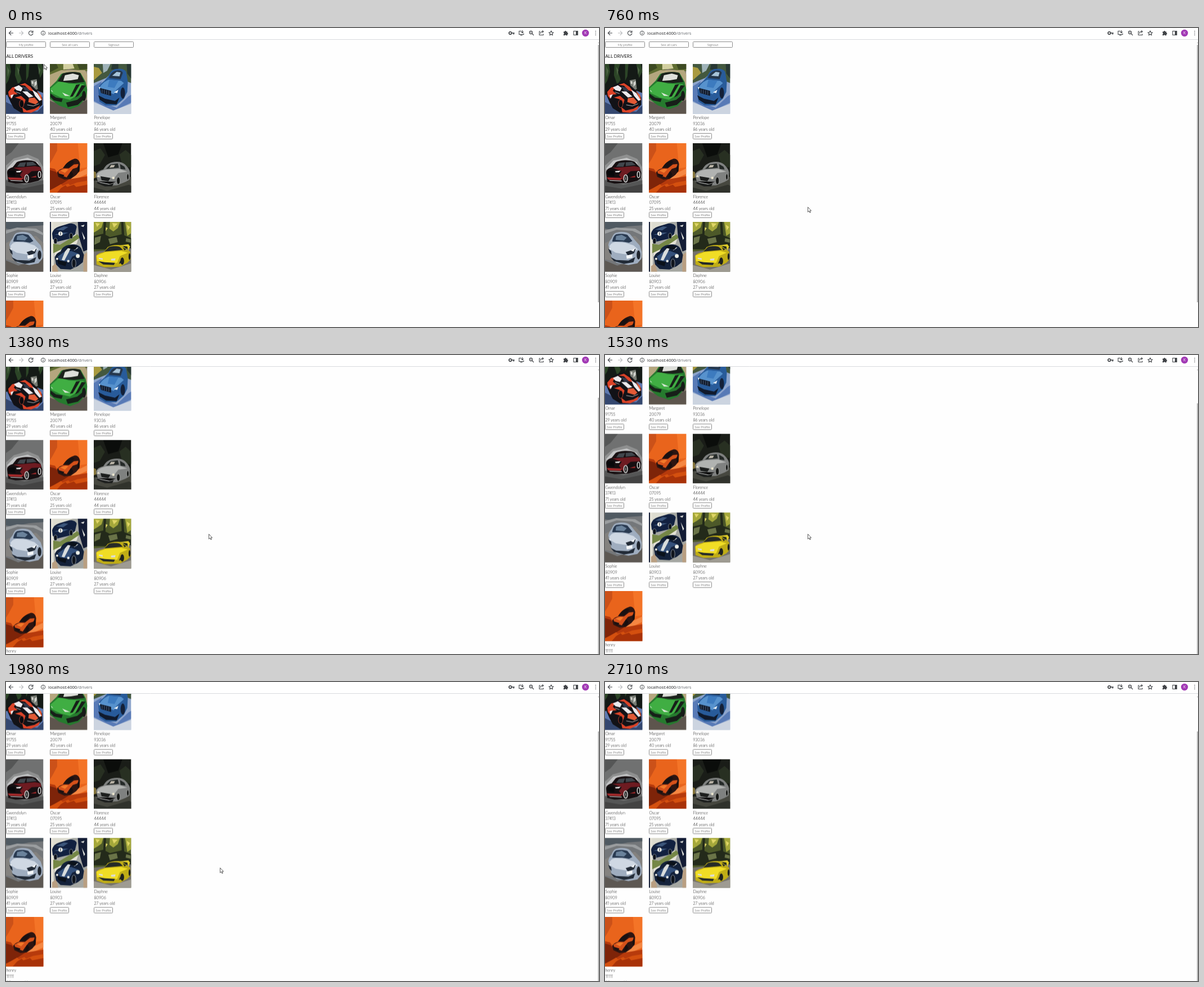
An HTML page for the animation above (5.13 s loop, 1054 by 532 pixels).

```html
<!DOCTYPE html>
<html lang="en">
<head>
<meta charset="utf-8">
<title>All drivers</title>
<style>
html, body { margin: 0; width: 100%; height: 100%; overflow: hidden; background: #fefefe; }
#stage { position: relative; width: 1054px; height: 532px; overflow: hidden; background: #fefefe; }
#page, #bar, #thumb, #cursor, .card, .btn, h1 { position: absolute; }
#page { inset: 0; font: 300 7.2px/10.6px Lato, "Open Sans", sans-serif; font-variant-numeric: proportional-nums; color: #111; white-space: nowrap; }
h1 { left: .5px; top: 44.5px; margin: 0; font: 400 7.9px/11px Lato, sans-serif; color: #111; }
.btn { box-sizing: border-box; height: 11px; border: 1px solid #8c8c8c; border-radius: 1.5px; background: #fff; color: #333; font: 300 6px/9.4px Lato, sans-serif; text-align: center; }
.nav { top: 24.4px; width: 71px; }
.card { width: 67px; }
.card svg { display: block; width: 66.5px; height: 88.7px; margin-bottom: 2.4px; }
.card p { margin: 0 0 0 .4px; }
.card .btn { left: 0; top: 122.6px; width: 34px; }
#bar { left: 0; top: 0; }
#thumb { left: 1052px; top: 30px; width: 2px; height: 458px; background: #b9b9b9; }
#cursor { left: 0; top: 0; }
#page, #thumb, #cursor { animation: 5130ms step-end infinite; }
#page { animation-name: scroll; }
#thumb { animation-name: thumb; }
#cursor { animation-name: point; }
@keyframes scroll {
  0% { transform: translateY(0); }
  23.976% { transform: translateY(-1px); }
  26.9% { transform: translateY(-53.7px); }
  29.824% { transform: translateY(-64.7px); }
  32.748%, 100% { transform: translateY(-67.5px); }
}
@keyframes thumb {
  0% { transform: translateY(0); }
  23.976% { transform: translateY(1px); }
  26.9% { transform: translateY(46px); }
  29.824% { transform: translateY(56px); }
  32.748%, 100% { transform: translateY(58px); }
}
@keyframes point {
  0% { transform: translate(67px, 64px); }
  3.118% { transform: translate(84px, 74px); }
  6.042% { transform: translate(129px, 117px); }
  8.966% { transform: translate(328px, 262px); }
  11.89% { transform: translate(360px, 317px); }
  14.814% { transform: translate(360px, 318px); }
  35.672% { transform: translate(361px, 320px); }
  38.596% { transform: translate(380px, 330px); }
  41.52% { transform: translate(436px, 344px); }
  44.054% { transform: translate(536px, 369px); }
  46.978% { transform: translate(840px, 463px); }
  49.902% { transform: translate(945px, 510px); }
  52.826%, 100% { transform: translate(1060px, 540px); }
}
</style>
</head>
<body>
<svg width="0" height="0" style="position:absolute">
<defs>
  <symbol id="red" viewBox="0 0 67 89" preserveAspectRatio="none">
    <path fill="#141a16" d="M0 0h67v89H0z"/>
    <path fill="#2c4527" d="M0 0h7l2 14-5 16-4 6zM17 0h10l-4 13 5 15-6 9-6-17zM36 0h6l-2 22-4 8zM56 0h8l3 13-6 12z"/>
    <path fill="#4c6443" d="M2 4l4 8-3 12zM20 5l4 6-2 10zM58 4l4 7-3 8z"/>
    <path fill="#777b73" d="M44 29l11-2 2 18-10 4z"/>
    <path fill="#d3d4ce" d="M46 30l3 1v5l-3-1zM51 33l4-3v6l-4 5z"/>
    <path fill="#5f7ab0" d="M0 56l10-6 47-2 10 4v37H0z"/>
    <path fill="#34476f" d="M0 68l12 6 18 9 26 2 11-11v15H0z"/>
    <path fill="#121217" d="M2 54c0-7 5-11 11-14l10-6 12-2 10 6 11 10 9 12v13l-9 8-13 6-16 0-13-8-6-11z"/>
    <path fill="#db4328" d="M4 50l7-8 8-2-5 8 7 6-9 1-3 7-4-5zM24 37l10-3 10 7 7 9-9-3-8-8zM16 60l11-3 8 7-2 7-7-8zM29 77l8 6 14-3 10-6-3 7-13 6-14-1z"/>
    <path fill="#eceaed" d="M14 42l9-4 7 5-3 6-8-2zM29 49l9 0 11 9-8 2zM47 46l9 6 8 12-4 2-8-9zM8 56l6-2-4 8z"/>
    <path fill="#e25a36" d="M41 61l10-1 7 8-5 4-13-4zM55 48l8 8 2 10-4-6z"/>
    <path fill="#30384a" d="M29 40l8 2 7 8-10-2z"/>
    <ellipse cx="28" cy="71" rx="4" ry="7" fill="#0b0b0f" stroke="#a7402f"/>
    <path stroke="#ddd" stroke-width=".8" fill="none" d="M38 73l11 2 10-4M18 50l8 3"/>
  </symbol>
  <symbol id="green" viewBox="0 0 67 89" preserveAspectRatio="none">
    <path fill="#8c8273" d="M0 0h67v89H0z"/>
    <path fill="#5f6d32" d="M0 0h67v13L34 9 0 20z"/>
    <path fill="#d2cfa0" d="M24 0h17l3 8-20 2z"/>
    <path fill="#3d4a22" d="M0 0h12l3 7-15 8zM49 0h18v9l-14 1z"/>
    <path fill="#b4a67e" d="M0 19l20-8 43 0 4 8v22H0z"/>
    <path fill="#5d554d" d="M0 66l35 12 32-14v25H0z"/>
    <path fill="#267a2e" d="M0 42l12-12 8-12c5-3 25-5 35-2l9 16 3 14-2 14-13 15-16 6-20-7L0 62z"/>
    <path fill="#40ae43" d="M1 44l16-14 17 5 27 1-12 20-13 8-16-4-17-8z"/>
    <path fill="#1b211b" d="M14 31l9-14c8-3 23-4 31-1l8 16-19 2-13-1z"/>
    <path fill="#dedfda" d="M27 20l14-3 11 3-2 7-12 2-14 1z"/>
    <path fill="#171f19" d="M47 37l7-1-13 22-5 1zM57 38l7 1-13 18-6 3zM1 53l10 7 12 2-2 6-14-3-6-6zM29 69l20-5 12-10v9l-11 10-18 4z"/>
    <path fill="#dbe9d9" d="M22 51l14 6-9 0zM2 46l4 4-3-1z"/>
    <ellipse cx="61" cy="57" rx="3.5" ry="9" fill="#171b18"/>
  </symbol>
  <symbol id="blue" viewBox="0 0 67 89" preserveAspectRatio="none">
    <path fill="#8ea5cc" d="M0 0h67v89H0z"/>
    <path fill="#43583f" d="M0 0h67v34l-10-4L40 9 22 25 0 34z"/>
    <path fill="#a99a3f" d="M0 5l9 2 6 9-7 6-8 7z"/>
    <path fill="#9eb2b8" d="M16 0h14l-6 12-7 4z"/>
    <path fill="#273733" d="M33 0h11v10H31zM59 0h8v26l-7-9z"/>
    <path fill="#587ab6" d="M0 40l14-9-4 26 9 13 22 8 21-20 5-3v14L35 84 0 66z"/>
    <path fill="#ccd4e0" d="M0 68l35 15 32-12v18H0z"/>
    <path fill="#285b9a" d="M8 44c1-6 6-10 11-14l7-8c3-7 7-12 13-13 8-1 15-1 19 5l3 18-1 18-6 12-14 12-19 0-11-7z"/>
    <path fill="#5792cd" d="M11 41c5-7 10-11 16-13l22 2 5 4-13 12-5 8-20-7z"/>
    <path fill="#3d7bbf" d="M28 28l16 2-7 13-12-2z"/>
    <path fill="#25374d" d="M27 25c3-8 7-12 13-13 6-1 11 0 12 4l-4 11z"/>
    <path fill="#a8c4d9" d="M33 21l8-7 7 1-2 7z"/>
    <path fill="#101a2c" d="M11 43l20 5 0 9-18-5zM8 56l12 6 18 4 8-6-5 12-19-1-11-7z"/>
    <path stroke="#7b91ad" stroke-width=".6" d="M15 45v7m4-6v7m4-6v7m4-6v7"/>
    <path fill="#edf4fa" d="M36 51l8-5-2 6zM9 41l3 1-2 4z"/>
    <ellipse cx="52" cy="52" rx="4" ry="10" fill="#142038"/>
  </symbol>
  <symbol id="maroon" viewBox="0 0 67 89" preserveAspectRatio="none">
    <path fill="#707171" d="M0 0h67v89H0z"/>
    <path fill="#555656" d="M0 0h23L10 16 0 23zM0 66l33 8 34-8v23H0z"/>
    <path fill="#8f9090" d="M0 40l14-13 25-7 19 8 9 16v18L0 65z"/>
    <path fill="#c3c4c5" d="M2 45l13-14 24-5 18 8 7 16-60 5z"/>
    <path fill="#434343" d="M0 76l29 5 38-8v16H0z"/>
    <path fill="#160f11" d="M2 53c0-5 3-8 10-10l7-9c8-4 25-5 34-1l9 10 3 10-1 9-6 5-16 4-25 1-13-3z"/>
    <path fill="#6e1b21" d="M13 44l16-1 23-2 10 2 1 6-17 1-10 8-3 9-8-10 5-7z"/>
    <path fill="#41474d" d="M20 42l5-7 11-1-3 8zM37 34l11-1 7 6-18 2z"/>
    <path fill="#09090b" d="M4 49l12 0 1 10-12-1z"/>
    <path fill="#a52a2b" d="M3 61l28 1-3 4-22-1zM44 61l10-3v3z"/>
    <path fill="#eee" d="M18 50l10-1-3 3-6 0zM7 66l23 1v1l-21-1z"/>
    <g fill="#111" stroke="#d5d5d5" stroke-width="1.5"><ellipse cx="37" cy="63" rx="3.4" ry="6.5"/><ellipse cx="60" cy="56" rx="2.3" ry="5.5"/></g>
    <path stroke="#aaa" stroke-width=".7" d="M37 58v10m-2-7l4 4m-4 0l4-4"/>
  </symbol>
  <symbol id="orange" viewBox="0 0 67 89" preserveAspectRatio="none">
    <path fill="#e9641c" d="M0 0h67v89H0z"/>
    <path fill="#cb5119" d="M0 0h13v13L5 28l-5 8z"/>
    <path fill="#f47427" d="M50 0h17v43l-13 2z"/>
    <path fill="#f58742" d="M38 59l29-14v10L38 68z"/>
    <path fill="#b63a0c" d="M0 44l9 2 8 12 20 6 30-5v30H0z"/>
    <path fill="#7e2409" d="M0 48l10 3 9 9 16 4-14 9-21 11z"/>
    <path fill="#d4500f" d="M8 80l12-7 3 3 10-4 3 3 13-5 18-3v22H0v-5z"/>
    <path fill="#a83208" d="M20 80l8-5 3 3 12-4 4 4 20-4v15H12z"/>
    <path fill="#2d1511" d="M13 53c1-4 5-6 10-8 5-8 11-14 20-17 6-2 10 3 11 9l-1 13-6 7-10 7-11 1-11-5z"/>
    <path fill="#d5511a" d="M15 50l9-5 10 0 9-7 8-1-1 6-9 3-7 9-4 6-13-5z"/>
    <path fill="#191112" d="M25 43c4-7 9-11 15-12l4 2-9 10zM16 54l10 3-3 4-6-3zM32 60l9-7 1 4-7 6z"/>
    <path fill="#f27a2a" d="M19 49l9-3 5 1-6 6z"/>
    <g fill="#170f0f"><ellipse cx="38" cy="56" rx="2.4" ry="5.5"/><ellipse cx="51" cy="46" rx="1.8" ry="5"/></g>
  </symbol>
  <symbol id="silver" viewBox="0 0 67 89" preserveAspectRatio="none">
    <path fill="#1a1d18" d="M0 0h67v89H0z"/>
    <path fill="#283022" d="M0 14l12-5 8 12-9 16-11 4zM46 20l11-8 10 9v22H52z"/>
    <path fill="#0b0d0b" d="M17 0h34l-7 20-18 5z"/>
    <path fill="#46473f" d="M0 67l28-5 39-2v29H0z"/>
    <path fill="#30322c" d="M0 79l24 6 39-11 4 2v13H0z"/>
    <path fill="#85753c" d="M0 50l4 2 1 9-5 2z"/>
    <path fill="#7f8180" d="M4 57c1-5 5-8 13-10 4-7 8-11 16-13 9-2 18-1 23 4 5 5 8 9 9 14l-1 13-7 4-15 6-18 1-16-5z"/>
    <path fill="#b1b3b1" d="M6 55c5-5 11-7 17-8l23-1 14 5-16 2-8 10-27-2z"/>
    <path fill="#242927" d="M22 46l8-8 13-2 2 8zM47 37l8 5 2 5-9-1z"/>
    <path fill="#bcb6a9" d="M31 39h7l-2 4-8 1z"/>
    <path fill="#1c1e1d" d="M12 59l18 3-4 6-12-2zM4 66l8 5 15 3 9-3-3 6-13 0-13-5z"/>
    <path stroke="#aaa" stroke-width=".7" d="M4 68l25 5 12-4"/>
    <g fill="#eee8d0"><circle cx="8" cy="59" r="1.8"/><circle cx="35" cy="62" r="2.2"/></g>
    <g fill="#151715" stroke="#9a9b98"><ellipse cx="44" cy="67" rx="3.2" ry="6.5"/><ellipse cx="61" cy="60" rx="2" ry="5.5"/></g>
  </symbol>
  <symbol id="white" viewBox="0 0 67 89" preserveAspectRatio="none">
    <path fill="#74777a" d="M0 0h67v89H0z"/>
    <path fill="#505a62" d="M0 0h67v6L41 8 13 14 0 12z"/>
    <path fill="#9b9ea0" d="M0 15l20-5 34 2 13 8v4L49 16 21 14 0 21z"/>
    <path fill="#84827f" d="M0 38l16-9 38-4 13 13v27l-29 9L0 67z"/>
    <path fill="#5d5853" d="M0 69l22 9 45-14v25H0z"/>
    <path fill="#9fadbf" d="M6 42c0-5 3-9 6-13 2-5 4-9 9-10 8-2 18-2 24 3l9 11 8 9 4 12-1 12-7 8-16 3-21-4-9-8z"/>
    <path fill="#cfd8e3" d="M8 43c3-5 7-7 12-7l16 1 15 5 8 7-11 5-11 4-18-3-10-6z"/>
    <path fill="#293a51" d="M13 35c1-6 3-11 7-13 6-1 14-1 20 1l9 11-6 3-12-2z"/>
    <path fill="#6a829b" d="M20 25l10-2 9 5-5 5-15-1z"/>
    <path fill="#222b37" d="M6 48l5 4 1 7-4-4zM37 54l18-6-3 8-11 4zM10 63l10 5 22 1 12-6-3 9-17 3-18-5z"/>
    <path fill="#f4f7fa" d="M7 46l3 2-1 2zM46 51l8-4-3 6zM38 60l11-2v6l-10 2z"/>
    <ellipse cx="60" cy="59" rx="3.3" ry="8" fill="#20262e"/>
  </symbol>
  <symbol id="navy" viewBox="0 0 67 89" preserveAspectRatio="none">
    <path fill="#a5a7a2" d="M0 0h67v89H0z"/>
    <path fill="#e4e2d6" d="M2 0h5v89H2zM8 47l14-6 24-19 6 4-4 13-40 23z"/>
    <path fill="#758746" d="M6 39l12 2 31-19 5 6-25 17L6 56z"/>
    <path fill="#131c35" d="M0 0h2v89H0zM50 0h17v50l-7 3-8-27z"/>
    <path fill="#b99f82" d="M60 59l7-5v35h-7zM4 79l7-5 4 15H4z"/>
    <path fill="#dddcd0" d="M6 0h35L23 7 6 13z"/>
    <path fill="#122140" d="M4 21c1-6 6-11 13-13l17-5c6-1 13 1 14 6l-3 13-10 8-25 6-5-6z"/>
    <path fill="#3d577c" d="M11 14l14-6 8 1-9 6zM8 23l14-4 11 0-10 4z"/>
    <circle cx="19" cy="21" r="3.8" fill="#f3f2e9"/>
    <path stroke="#17233c" stroke-width="1.1" d="M19 18.5v5"/>
    <g fill="#0d121b" stroke="#a4adb5" stroke-width=".7"><ellipse cx="10" cy="34" rx="3" ry="5"/><ellipse cx="38" cy="25" rx="3" ry="5"/></g>
    <path fill="#13213a" d="M9 64c1-6 5-9 10-11 3-7 8-11 16-12 9-2 17 0 21 6l5 12-2 13-9 7-13 6-18-1-8-8z"/>
    <path fill="#34507a" d="M14 62l11-8 13-2 14 5-12 5-5 9-17-2z"/>
    <path fill="#d9dddd" d="M27 53l7-8 4 0-4 9-8 15-5-1zM40 44l11 2-7 5z"/>
    <path fill="#0a111a" d="M13 68l17 4-2 7-13-4zM29 46l9-5 12 3-5 6z"/>
    <circle cx="50" cy="61" r="3.5" fill="#eceee7"/>
    <g fill="#e9eae4"><circle cx="13" cy="66" r="2"/><circle cx="33" cy="70" r="2.2"/><path d="M57 17l6 12-2 3zM55 7l7-2-2 4z"/></g>
    <ellipse cx="43" cy="74" rx="3.6" ry="8" fill="#10151d" stroke="#88909a"/>
  </symbol>
  <symbol id="yellow" viewBox="0 0 67 89" preserveAspectRatio="none">
    <path fill="#4d5929" d="M0 0h67v89H0z"/>
    <path fill="#a5a83b" d="M0 0h17l-3 10-7 5-7 4zM29 0h18l-4 11-8 6-7-5zM56 0h11v20l-7 5z"/>
    <path fill="#e0d666" d="M3 2l8 1-5 6zM33 2l10 1-7 7zM59 5l6 4-4 6zM20 9l5 2-4 6z"/>
    <path fill="#232a1a" d="M18 0h4l-2 44h-4zM49 0h4l3 44h-5zM0 25l17-4 12 6 21-5 17 7v20H0z"/>
    <path fill="#6a7448" d="M2 28l11-3-2 11-10 5zM26 30l15-3 2 9-14 4zM58 29l8 2v6l-9-2z"/>
    <path fill="#74716a" d="M0 53l67-6v42H0z"/>
    <path fill="#9e9b92" d="M0 77l31 8 36-11v15H0z"/>
    <path fill="#c0ad16" d="M4 61c3-4 8-6 14-7l7-9c7-4 20-5 27-2l7 6 6 4 1 14-6 6-13 7-28 1-14-5z"/>
    <path fill="#f0dd25" d="M5 60l16-6 28-2 12 3-14 6-5 12-23 1-13-4z"/>
    <path fill="#252a27" d="M19 53l8-8c7-2 15-2 20 0l5 5zM52 45l6 4-3 2zM8 70l12 2 18 1-2 4-19-1zM47 70l6-4-1 6-7 3z"/>
    <path fill="#ddd" d="M9 64l7 1v3l-7-2zM31 66l8-1-1 4h-7z"/>
    <path fill="#dfcb29" d="M46 42l16-2 3 4-3 8-2-8z"/>
    <g fill="#1e211e"><ellipse cx="51" cy="70" rx="3.3" ry="6.5"/><ellipse cx="64" cy="62" rx="1.7" ry="6"/></g>
  </symbol>
</defs>
</svg>
<div id="stage">
  <div id="page"><h1>ALL DRIVERS</h1></div>
  <div id="thumb"></div>
  <svg id="bar" width="1054" height="30" fill="none" stroke="#3f4246" stroke-width="1.1">
    <path fill="#fff" stroke="none" d="M0 0h1054v20H0z"/>
    <path stroke="#d9dadd" stroke-width="1" d="M0 20.5h1054"/>
    <path d="M13 9H5.5m3.7-3.8L5.4 9l3.8 3.8"/>
    <path stroke="#b9bbbe" d="M23 9h7.5m-3.7-3.8L30.6 9l-3.8 3.8"/>
    <path d="M47 6.4A3.8 3.8 0 1 0 48 9.6M48 4.8v2.8h-3"/>
    <circle cx="66" cy="9" r="3.7" stroke-width=".9"/>
    <path d="M66 8.4v2.7M66 6.6v1"/>
    <g font-family="Open Sans, Noto Sans, sans-serif" stroke="none">
      <text x="75" y="11.8" font-size="7.6" fill="#202124">localhost:4000<tspan fill="#676b70">/drivers</tspan></text>
      <circle cx="1030" cy="9" r="6.2" fill="#a23ab5"/>
      <text x="1030" y="11.3" font-size="6.5" fill="#fff" text-anchor="middle">K</text>
    </g>
    <circle cx="896.3" cy="9" r="2.3" stroke-width="1.6"/>
    <path stroke-width="1.7" d="M898.5 9h5.3m-1.4 0v2.6"/>
    <path d="M916 5.5h-4v6h8v-2M914 13h4M917.8 4v4.5m-2-1.8l2 2 2-2"/>
    <circle cx="933" cy="8" r="2.6"/>
    <path d="M935 10l3 3M931.8 8h2.4"/>
    <path d="M949.5 6H948v6.5h7v-2M950 10c0-3 2-3.7 5-3.7m-1.8-2l2 2-2 2"/>
    <path stroke-linejoin="round" d="M969 5l1.2 2.7 2.9.3-2.2 1.9.7 2.9-2.6-1.5-2.6 1.5.7-2.9-2.2-1.9 2.9-.3z"/>
    <path fill="#3f4246" stroke="none" d="M991 6.4h2a1.4 1.4 0 0 1 2.8 0h2v2.3a1.3 1.3 0 0 1 0 2.6v2h-2.3a1.3 1.3 0 0 0-2.5 0h-2v-2.2a1.3 1.3 0 0 0 0-2.5z"/>
    <path d="M1009 5.5h7v7h-7z"/>
    <path fill="#3f4246" stroke="none" d="M1012.8 5h3.7v8h-3.7z"/>
    <path stroke-width="1.5" stroke-linecap="round" d="M1048 5.7h.01M1048 9h.01M1048 12.3h.01"/>
    <path stroke="#999" stroke-width="1" d="M1052.5 26.5h1.5"/>
  </svg>
  <svg id="cursor" width="8" height="12"><path d="M.6.7v8.7l2-1.8 1.5 3.1 1.3-.6-1.4-3h2.6z" fill="#fff" stroke="#333" stroke-width=".8"/></svg>
</div>
<script>
const drivers = [
  ["Omar", "91755", 29, "red"], ["Margaret", "20079", 40, "green"], ["Penelope", "93036", 86, "blue"],
  ["Gwendolyn", "37413", 71, "maroon"], ["Oscar", "07095", 25, "orange"], ["Florence", "44444", 44, "silver"],
  ["Sophie", "80909", 41, "white"], ["Louise", "80903", 27, "navy"], ["Daphne", "80906", 27, "yellow"],
  ["henry", "11111", 30, "orange"]
];
const column = i => i % 3 * 78;
const nav = ["My profile", "See all cars", "Signout"].map((label, i) =>
  `<div class="btn nav" style="left:${column(i)}px">${label}</div>`);
const cards = drivers.map(([name, zip, age, car], i) =>
  `<div class="card" style="left:${column(i)}px;top:${64.2 + Math.floor(i / 3) * 140.4}px">
    <svg><use href="#${car}" width="66.5" height="88.7"/></svg>
    <p>${name}</p><p>${zip}</p><p>${age} years old</p>
    <div class="btn">See Profile</div>
  </div>`);
document.getElementById("page").insertAdjacentHTML("beforeend", nav.concat(cards).join(""));
</script>
</body>
</html>
```
